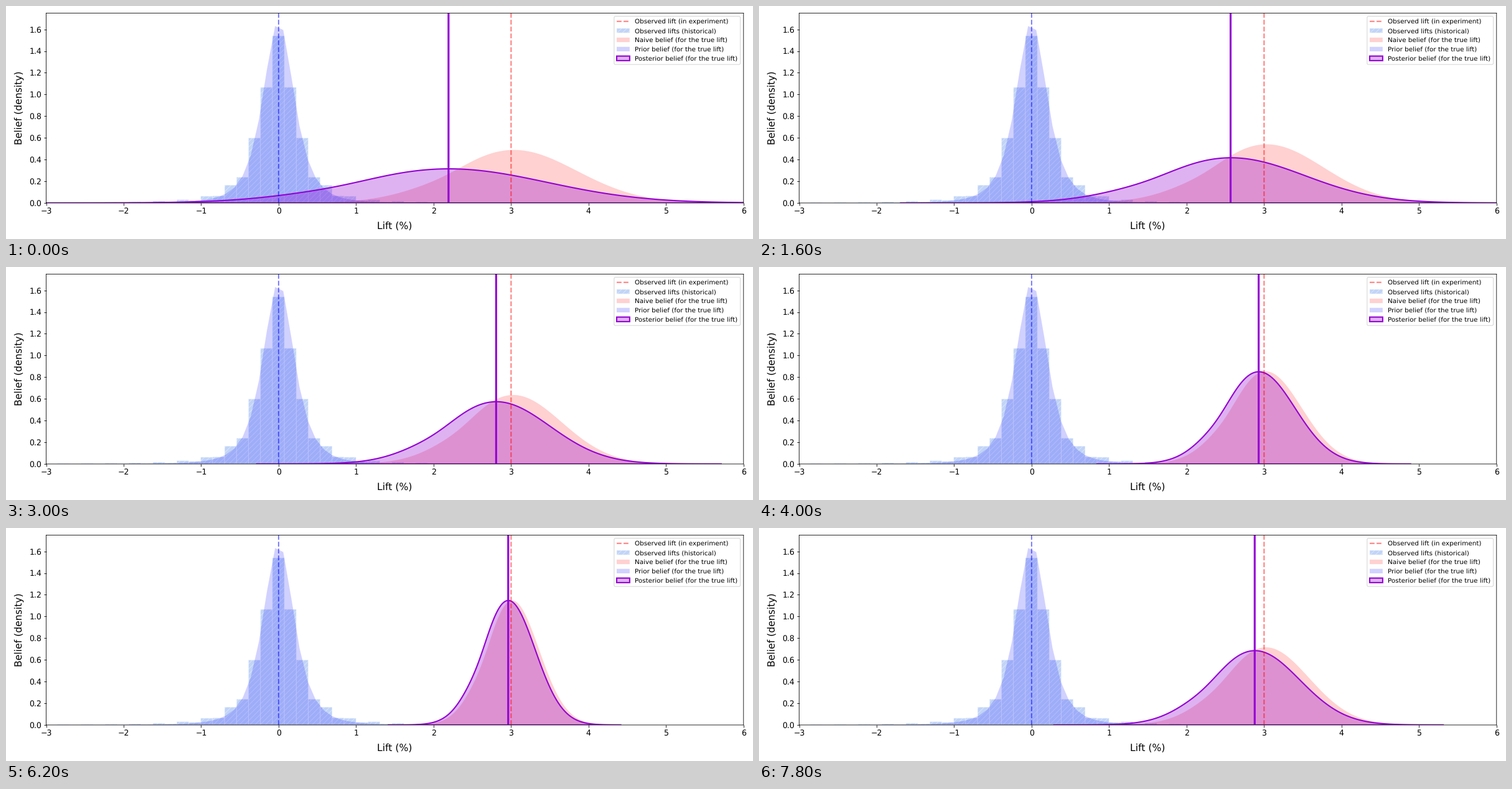
Recreate the animation shown at these times as a matplotlib script. Size 1200 px wide and 375 px high, loop 8 s.

```python
import numpy as np
import matplotlib.pyplot as plt
from matplotlib.animation import FuncAnimation

W, H, DPI = 1200, 375, 75
FRAMES, STEP_MS = 40, 200
TURN = 28          # the sharpest beliefs; the motion then runs backwards
LIFT = 3.0

plt.rcParams["path.snap"] = False
plt.rcParams["text.hinting"] = "none"

# Standardised belief: nearly normal, with a slight shoulder on the left.
Z = np.linspace(-4.45, 4.18, 250)
BELL = np.clip(np.exp(-Z**2 / 2) - 0.04 * np.exp(-((Z + 1.05) / 0.5) ** 2), 0, None)


def sd_of(peak):
    return 1 / (peak * np.sqrt(2 * np.pi))


def outline(center, peak):
    """Closed area between a belief curve and the base line."""
    x = center + Z * sd_of(peak)
    return np.column_stack([np.r_[x[0], x, x[-1]], np.r_[0, peak * BELL, 0]])


def beliefs(step):
    """Naive peak, posterior center and posterior peak."""
    # The naive belief sharpens at a constant rate, first slowly, then fast.
    naive_peak = np.exp(max(-0.715 + 0.0126 * step, -1.337 + 0.059 * step))
    sd = sd_of(naive_peak)
    # The wider it is, the more the prior pulls and flattens the posterior.
    d = sd - 0.347
    pull = np.exp(-3.3 + 4.9 * d + 3.6 * d * d)
    post_peak = naive_peak * (1 - 2.28 * max(sd - 0.42, 0) ** 2)
    return naive_peak, LIFT - pull, post_peak


fig, ax = plt.subplots(figsize=(W / DPI, H / DPI), dpi=DPI)
fig.subplots_adjust(left=64.5 / W, right=1184.8 / W,
                    bottom=1 - 317 / H, top=1 - 11.4 / H)
ax.set_xlim(-3, 6)
ax.set_ylim(0, 1.75)
ax.set_yticks(np.arange(0, 1.7, 0.2))
ax.tick_params(labelsize=12)
fig.text(624.6 / W, 12.9 / H, "Lift (%)", size=15, ha="center", va="bottom")
fig.text(13.6 / W, 1 - 164 / H, "Belief (density)", size=15, rotation=90,
         ha="left", va="center")

# Past lifts: a heavy-tailed histogram whose bins get rougher outwards.
k = np.arange(-19, 13)
rough = 1 + 0.04 * np.abs(k) * (-1.0) ** k
heights = 1.54 * rough * (1 + k**2 / 4.1) ** -1.5
hist = ax.bar(-0.003 + 0.1542 * k, heights, 0.1542, color="cornflowerblue",
              edgecolor="white", hatch="///", alpha=0.4,
              label="Observed lifts (historical)")

grid = -0.045 + 0.105 * np.arange(-40, 60)
prior = ax.fill_between(grid, 1.68 * (1 + (grid / 0.212) ** 2 / 3) ** -2,
                        color="blue", alpha=0.18, lw=0,
                        label="Prior belief (for the true lift)")

naive = ax.fill([0, 1, 1], [0, 0, 1], fc="red", ec="none", alpha=0.18,
                label="Naive belief (for the true lift)")[0]
post = ax.fill([0, 1, 1], [0, 0, 1], fc=("darkviolet", 0.3), ec="darkviolet",
               lw=2, label="Posterior belief (for the true lift)")[0]

ax.axvline(0, color="blue", alpha=0.5, ls="--", lw=2)
observed = ax.axvline(LIFT, color="red", alpha=0.5, ls="--", lw=2,
                      label="Observed lift (in experiment)")
post_line = ax.axvline(LIFT, color="darkviolet", lw=3)

ax.legend(handles=[observed, hist, naive, prior, post], loc="upper right",
          fontsize=10)


def draw(i):
    naive_peak, center, post_peak = beliefs(min(i, 2 * TURN - i))
    naive.set_xy(outline(LIFT + 0.016 / naive_peak, naive_peak))
    post.set_xy(outline(center, post_peak))
    post_line.set_xdata([center, center])
    return naive, post, post_line


anim = FuncAnimation(fig, draw, frames=FRAMES, init_func=lambda: draw(0),
                     interval=STEP_MS, repeat=True, repeat_delay=0)
plt.show()
```
